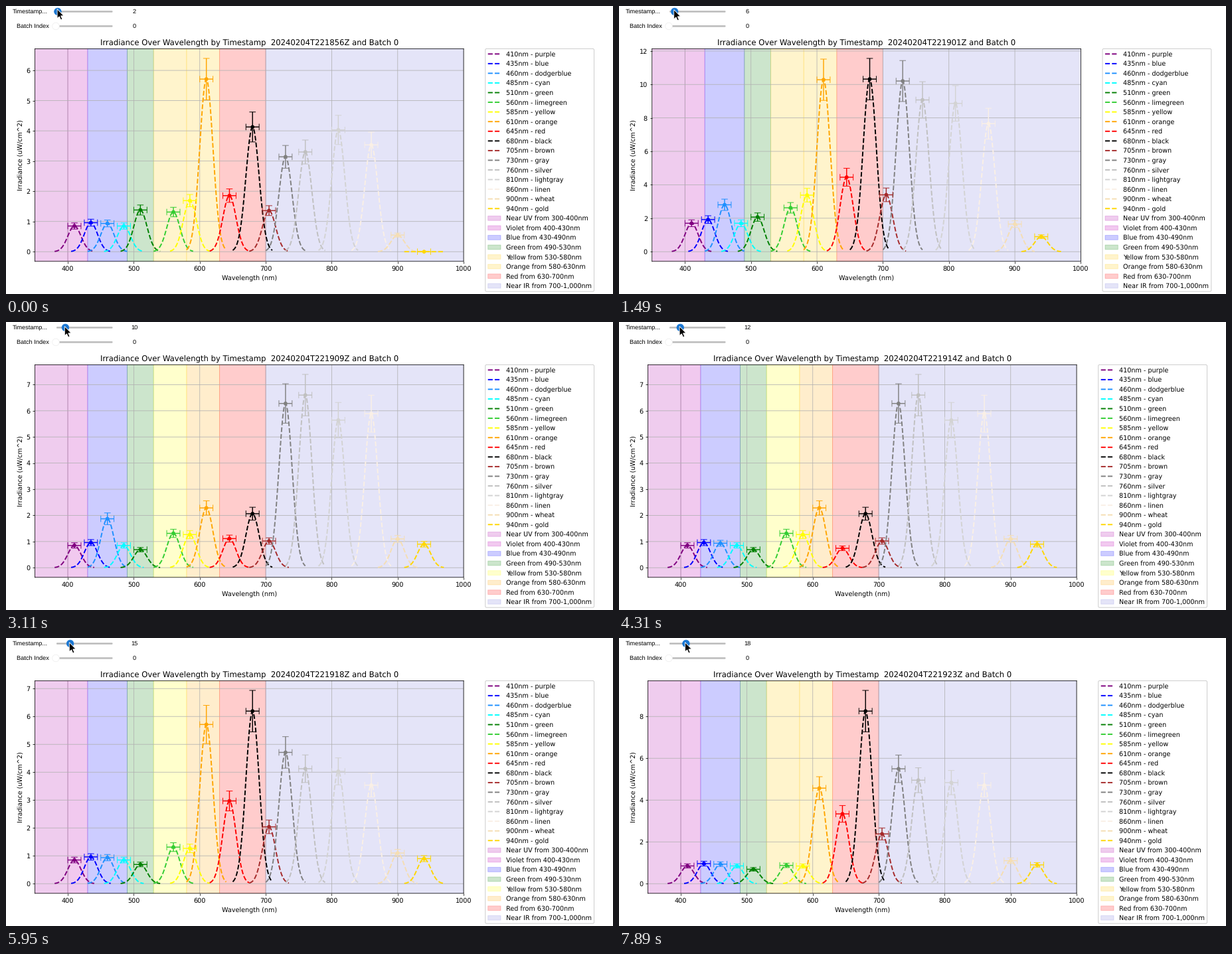
A matplotlib script that plays this animation: 914x434 px, repeating every 8000 ms.

```python
import numpy as np
import matplotlib.pyplot as plt
from matplotlib.animation import FuncAnimation
from matplotlib.collections import LineCollection
from matplotlib.patches import Circle, FancyBboxPatch, Polygon, Rectangle

W, H, DPI = 914, 434, 69.4
LOOP, TICK, LAG = 8000, 50, 150

plt.rcParams.update({"font.family": "DejaVu Sans", "text.hinting": "none",
                     "path.snap": False})

# wavelength (nm), colour, irradiance of one sensor count, counts at full light
CHANNELS = [
    (410, "purple", .85, 2), (435, "blue", .96, 2),
    (460, "dodgerblue", .935, 3.4), (485, "cyan", .85, 2),
    (510, "green", .69, 3.7), (560, "limegreen", .4375, 7.3),
    (585, "yellow", .4225, 10), (610, "orange", 1.1425, 11),
    (645, "red", .371, 15), (680, "black", 1.032, 10),
    (705, "brown", .34, 12), (730, "gray", .785, 14.6),
    (760, "silver", .825, 12.45), (810, "lightgray", .806, 11.55),
    (860, "linen", .589, 14), (900, "wheat", .55, 3.3),
    (940, "gold", .9, 1.1),
]
NM, COLORS, UNIT, FULL = zip(*CHANNELS)
NM, UNIT, FULL = map(np.array, (NM, UNIT, FULL))

BANDS = [
    ("Near UV", 300, 400, "#b000aa33"), ("Violet", 400, 430, "#c000b836"),
    ("Blue", 430, 490, "#0000ff33"), ("Green", 490, 530, "#00800033"),
    ("Yellow", 530, 580, "#ffff0033"), ("Orange", 580, 630, "#ffa50033"),
    ("Red", 630, 700, "#ff000033"), ("Near IR", 700, 1000, "#7878dc33"),
]
AMBER = "#ffc80033"

# timestamp index: seconds after 22:18, light level (%) at the anchors
ANCHORS = [460, 585, 610, 645, 680, 705, 730, 860]
LIGHT = {
    2: (56, [40, 44, 45, 33, 40, 34, 30, 45]),
    4: (59, [100] * 8),
    8: (67, [50, 34, 27, 20, 90, 42, 62, 70]),
    9: (69, [45, 33, 18, 20, 20, 25, 58, 68]),
    12: (74, [39, 34, 18, 13, 20, 25, 58, 68]),
    15: (78, [39, 34, 45, 53, 60, 50, 41, 46]),
    18: (83, [39, 20, 36, 60, 80, 58, 46, 54]),
}

# (ms, slider value): the drag speeds up and pauses between these points
DRAG = [(0, 2), (290, 3), (890, 5), (1490, 6), (2220, 9), (3110, 10),
        (3710, 11), (4160, 12), (5060, 13), (5500, 15), (6400, 16),
        (7150, 17), (7740, 18)]


def slider_at(ms):
    return int(np.interp(ms, *zip(*DRAG)))


def reading(index):
    """Seconds and irradiances; the sensor reports whole counts."""
    keys = list(LIGHT)
    secs, levels = zip(*LIGHT.values())
    level = [np.interp(index, keys, col) for col in zip(*levels)]
    counts = np.round(FULL * np.interp(NM, ANCHORS, level) / 100)
    return round(np.interp(index, keys, secs)), counts * UNIT


def box(x, y, w, h):
    return [x / W, 1 - (y + h) / H, w / W, h / H]


def pixel_axes(x, y, w, h):
    axes = fig.add_axes(box(x, y, w, h))
    axes.set(xlim=(0, w), ylim=(h, 0))
    axes.set_axis_off()
    return axes


fig = plt.figure(figsize=((W + .01) / DPI, (H + .01) / DPI), dpi=DPI,
                 facecolor="white")

# Chart
PLOT = (43.4, 64.4, 645.7, 320.4)
ax = fig.add_axes(box(*PLOT))
spans = [ax.axvspan(a, b, color=c) for _, a, b, c in BANDS]
ax.grid(True)
ax.set_xlim(350, 1000)
ax.set_xlabel("Wavelength (nm)")
ax.set_ylabel("Irradiance (uW/cm^2)")
title = ax.set_title("")

curves = LineCollection([], colors=COLORS, linewidths=2, linestyles="--",
                        zorder=2)
bars = LineCollection([], colors=COLORS * 2, linewidths=1.5, zorder=2.1)
for group in (curves, bars):
    ax.add_collection(group, autolim=False)


def marks(marker, size, colors, lw):
    zeros = np.zeros(len(colors))
    return ax.scatter(zeros, zeros, s=size ** 2, c=colors, marker=marker,
                      linewidths=lw, zorder=2.2)


dots = marks("o", 6, COLORS, 0)
ycaps = marks("_", 10, COLORS * 2, 1)
xcaps = marks("|", 10, COLORS * 2, 1)

# Legend
KEY = (721.7, 64.4, 163.8, 365.8)
key = pixel_axes(*KEY)
key.add_patch(FancyBboxPatch((0, 0), KEY[2], KEY[3], fc="white", ec="0.8",
                             boxstyle="round,pad=0,rounding_size=1.9",
                             clip_on=False))
labels = [f"{nm}nm - {c}" for nm, c in zip(NM, COLORS)]
labels += [f"{name} from {a}-{b:,}nm" for name, a, b, _ in BANDS]
rows = 11.3 + 14.56 * np.arange(len(labels))
for y, label in zip(rows, labels):
    key.text(31, y, label, fontsize=10, va="baseline")
key.add_collection(LineCollection(
    [[(4, y - 3.4), (23.3, y - 3.4)] for y in rows[:len(NM)]],
    colors=COLORS, linewidths=2, linestyles="--"), autolim=False)
swatches = [key.add_patch(Rectangle((4, y - 6.75), 19.3, 6.75, color=c))
            for y, (*_, c) in zip(rows[len(NM):], BANDS)]

# Sliders and pointer
ui = pixel_axes(0, 0, W, 44)


def ui_text(x, y, text, **kw):
    return ui.text(x, y, text, family="Liberation Sans", fontsize=9.6,
                   va="baseline", **kw)


def slider(x, y, label):
    ui_text(x, y + 3, label)
    ui.add_patch(FancyBboxPatch((76, y - 1.3), 84.5, 2.6, fc="#bdbdbd",
                                boxstyle="round,pad=0,rounding_size=1",
                                lw=0))
    knob = ui.add_patch(Circle((75, y), 5.3, fc="white", ec="#ececec",
                               lw=.7, zorder=2))
    return knob, ui_text(193, y + 3, "0", ha="center")


knob, value = slider(10, 8.4, "Timestamp...")
slider(16, 30.4, "Batch Index")
knob.set(fc="#1976d2", ec="#1976d2")
ARROW = np.array([(0, 0), (0, 14.2), (3.2, 11.2), (5.4, 16.2), (7.7, 15.2),
                  (5.5, 10.3), (10, 10.2)])
pointer = ui.add_patch(Polygon(ARROW, fc="black", ec="white", lw=.9,
                               zorder=3))


def draw_chart(index):
    secs, peak = reading(index)
    top = peak.max() * 1.12
    # two-digit tick labels push the plot and its legend to the right
    shift = 6.3 if top * 1.05 >= 10 else 0
    ax.set_position(box(PLOT[0] + shift, *PLOT[1:]))
    key.set_position(box(KEY[0] + shift, *KEY[1:]))
    ax.set_ylim(-top * .05, top * 1.05)
    title.set_text("Irradiance Over Wavelength by Timestamp  20240204T22"
                   f"{18 + secs // 60}{secs % 60:02d}Z and Batch 0")

    u = np.linspace(-30, 30, 100)
    bell = np.exp(-(u / 10) ** 2 / 2)
    curves.set_segments([np.c_[m + u, p * bell] for m, p in zip(NM, peak)])
    err = peak * .12
    bars.set_segments(
        [[(m - 10, p), (m + 10, p)] for m, p in zip(NM, peak)]
        + [[(m, p - e), (m, p + e)] for m, p, e in zip(NM, peak, err)])
    dots.set_offsets(np.c_[NM, peak])
    ycaps.set_offsets(np.c_[np.tile(NM, 2), np.r_[peak - err, peak + err]])
    xcaps.set_offsets(np.c_[np.r_[NM - 10, NM + 10], np.tile(peak, 2)])

    merged = index < 9 or index > 15
    for i in (4, 5):
        tint = AMBER if merged else BANDS[i][3]
        spans[i].set_color(tint)
        swatches[i].set_color(tint)


def draw_slider(pos):
    value.set_text(str(pos))
    knob.center = (75 + 1.44 * pos, 8.4)
    tip = (74.3 + 1.4 * pos, np.interp(pos, [2, 10], [4.6, 6.6]))
    pointer.set_xy(ARROW + tip)


def update(i):
    now = (i + 1) * TICK - 1
    draw_slider(slider_at(now))
    draw_chart(slider_at(now - LAG))  # the plot redraws after the slider
    return []


anim = FuncAnimation(fig, update, frames=LOOP // TICK, interval=TICK,
                     init_func=lambda: update(0), repeat=True,
                     repeat_delay=0)
plt.show()
```
